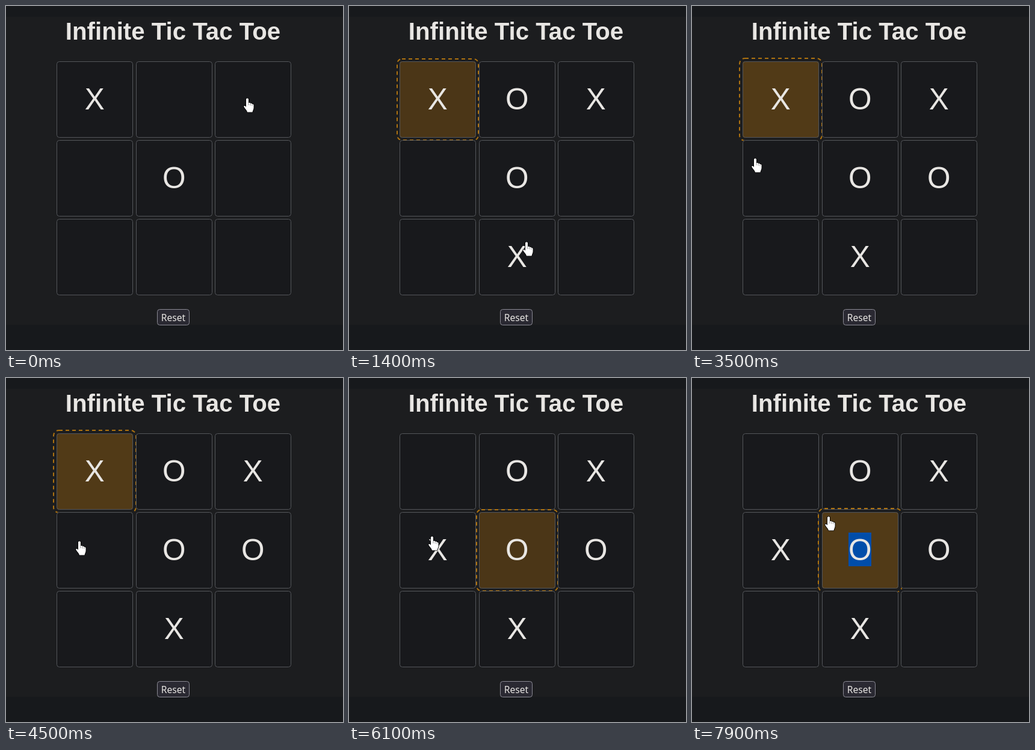
An HTML page with a canvas for the animation above (8 s loop, 560 by 572 pixels).

```html
<!DOCTYPE html>
<html lang="en">
<head>
<meta charset="utf-8">
<title>Infinite Tic Tac Toe</title>
<style>
html, body { margin: 0; width: 100%; height: 100%; overflow: hidden; background: #17191c; }
canvas { display: block; }
</style>
</head>
<body>
<canvas id="stage" width="560" height="572"></canvas>
<script>
const ctx = document.getElementById('stage').getContext('2d');
const LOOP = 8000, SIZE = 127, PULSE = 1500, INK = '#e8e6e3';
const COLS = [84, 216, 347], ROWS = [92, 223, 354];

// Marks: cell, symbol, time placed, time removed
const marks = [
  [0, 'X', 0, 5850], [4, 'O', 0, LOOP], [2, 'X', 200, LOOP], [1, 'O', 800, LOOP],
  [7, 'X', 1150, LOOP], [5, 'O', 2900, LOOP], [3, 'X', 5850, LOOP]
];
// Highlights of the oldest mark: cell, start, end
const highlights = [[0, 1150, 5850], [4, 5850, LOOP]];
const SELECT_AT = 7600;

// Pointer: time, x, y of the fingertip
const route = [
  [0, 401, 154], [300, 401, 154], [700, 290, 150], [850, 288, 152],
  [1120, 295, 393], [1500, 295, 393], [2300, 378, 300], [2600, 381, 301],
  [3000, 381, 301], [3400, 106, 254], [3600, 104, 254], [4500, 122, 272],
  [4900, 124, 268], [5350, 133, 183], [5600, 133, 183], [5800, 137, 264],
  [6300, 138, 264], [6600, 219, 222], [7200, 221, 225], [7700, 227, 231], [LOOP, 227, 231]
];
const hand = new Path2D('M-2 1C-2 -1 2 -1 2 1V7.5C3 6.4 5 6.8 5.2 8.2C6.4 7.3 8 7.9 8.1 9.3' +
  'C9.2 8.6 10.6 9.3 10.6 11V15C10.6 18 9 19.5 8.5 22.5H0C-.7 19.5 -3.5 17.5 -5.6 13.8' +
  'C-6.3 12.2 -4.6 11.3 -3.4 12.4L-2 13.8Z');

const bezier = (a, b, s) => 3 * a * s * (1 - s) ** 2 + 3 * b * s * s * (1 - s) + s ** 3;
function ease(x) {
  let lo = 0, hi = 1;
  for (let i = 0; i < 20; i++) {
    const mid = (lo + hi) / 2;
    if (bezier(.25, .25, mid) < x) lo = mid; else hi = mid;
  }
  return bezier(.1, 1, lo);
}

function pulse(age) {
  const phase = age % PULSE / PULSE * 2;
  return phase < 1 ? ease(phase) : 1 - ease(phase - 1);
}

function box(x, y, w, h, r) {
  ctx.beginPath();
  ctx.roundRect(x, y, w, h, r);
}

function label(text, x, y, font) {
  ctx.font = font;
  ctx.fillStyle = INK;
  ctx.fillText(text, x, y);
}

function drawCell(i, t) {
  const x = COLS[i % 3], y = ROWS[i / 3 | 0];
  const lit = highlights.find(([cell, from, to]) => cell === i && t >= from && t < to);
  const mark = marks.find(([cell, , from, to]) => cell === i && t >= from && t < to);

  box(x, y, SIZE, SIZE, 4);
  ctx.fillStyle = '#18191c';
  ctx.fill();
  if (lit) {
    ctx.globalAlpha = ease(Math.min(1, (t - lit[1]) / 400));
    ctx.fillStyle = '#513a17';
    ctx.fill();
    ctx.globalAlpha = 1;
  }
  box(x + .5, y + .5, SIZE - 1, SIZE - 1, 4);
  ctx.strokeStyle = '#54565a';
  ctx.lineWidth = 1;
  ctx.stroke();

  if (lit) {
    const grow = 1 + Math.round(5 * pulse(t - lit[1]));
    box(x - grow, y - grow, SIZE + 2 * grow, SIZE + 2 * grow, 4 + grow);
    ctx.strokeStyle = '#ae720f';
    ctx.lineWidth = 2;
    ctx.setLineDash([6, 5]);
    ctx.stroke();
    ctx.setLineDash([]);
  }
  if (i === 4 && t >= SELECT_AT) {
    ctx.fillStyle = '#004daa';
    ctx.fillRect(260, 257, 38, 56);
  }
  if (mark) label(mark[1], x + 63.3, y + 80, '49.5px "Liberation Sans", Arial, sans-serif');
}

function drawPointer(t) {
  const n = route.findIndex(p => p[0] > t);
  const [t0, x0, y0] = route[n - 1], [t1, x1, y1] = route[n];
  const u = (t - t0) / (t1 - t0), k = u * u * (3 - 2 * u);
  ctx.save();
  ctx.translate(Math.round(x0 + (x1 - x0) * k), Math.round(y0 + (y1 - y0) * k));
  ctx.strokeStyle = '#000';
  ctx.lineWidth = 1.6;
  ctx.stroke(hand);
  ctx.fillStyle = '#fff';
  ctx.fill(hand);
  ctx.strokeStyle = '#555';
  ctx.lineWidth = .6;
  ctx.stroke(new Path2D('M2 7.5V11M5.2 8.2V11.5M8.1 9.3V12'));
  ctx.restore();
}

function draw(now) {
  const t = now % LOOP;
  ctx.fillStyle = '#17191c';
  ctx.fillRect(0, 0, 560, 572);
  ctx.fillStyle = '#1c1d1f';
  ctx.fillRect(0, 18, 560, 512);

  ctx.textAlign = 'center';
  label('Infinite Tic Tac Toe', 277.5, 56, 'bold 40.2px "Liberation Sans", Arial, sans-serif');
  for (let i = 0; i < 9; i++) drawCell(i, t);

  box(251.5, 504.5, 53, 26, 4);
  ctx.fillStyle = '#2a2932';
  ctx.fill();
  ctx.strokeStyle = '#8b8a94';
  ctx.lineWidth = 1;
  ctx.stroke();
  label('Reset', 278, 524, '15.6px "Noto Sans", "Open Sans", sans-serif');

  drawPointer(t);
  requestAnimationFrame(draw);
}
requestAnimationFrame(draw);
</script>
</body>
</html>
```
